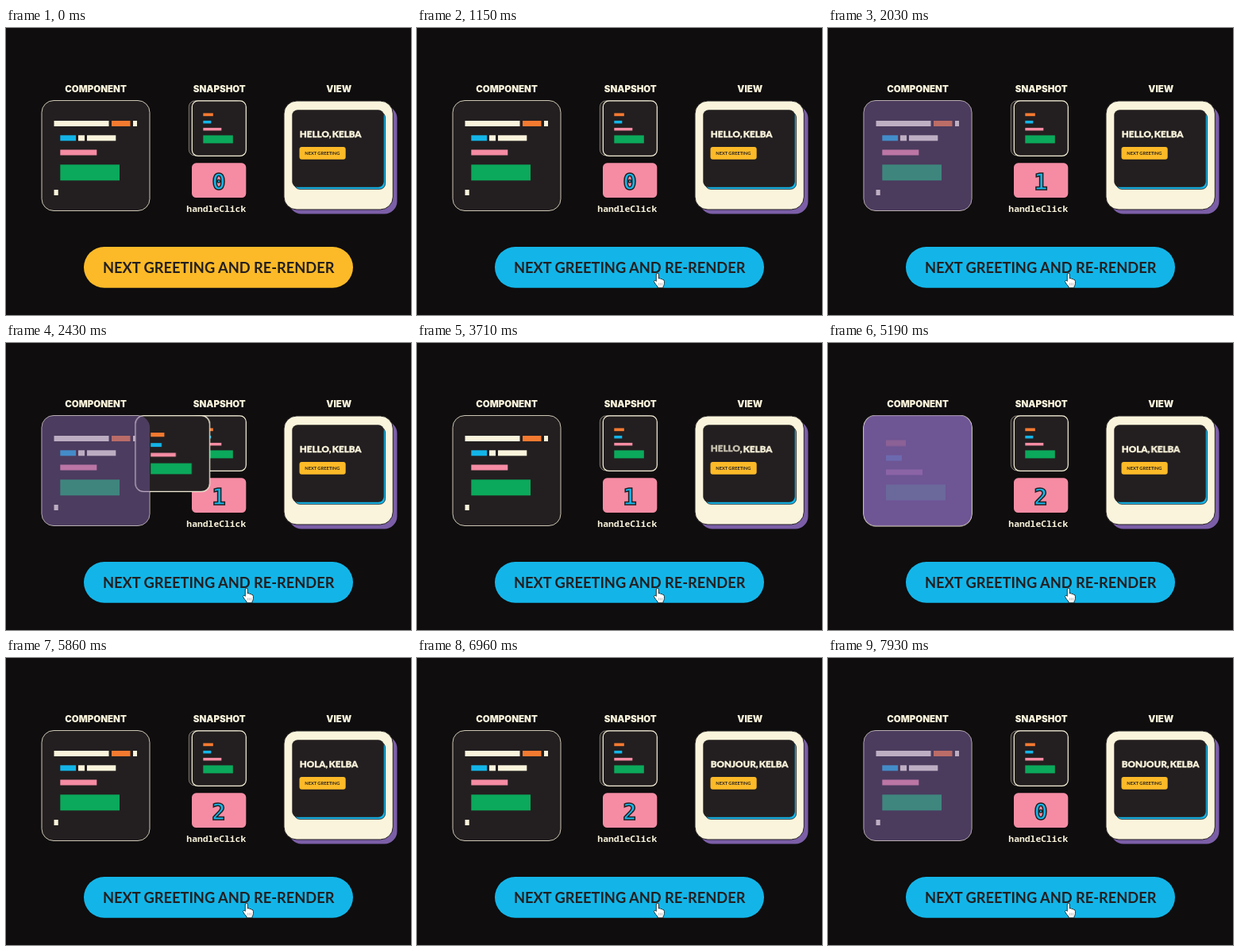
An HTML page for the animation above (8 s loop, 510 px wide and 362 px high).

```html
<!DOCTYPE html>
<html lang="en">
<head>
<meta charset="utf-8">
<title>Component, snapshot, view</title>
<style>
  :root {
    --cream: #faf4dc; --dark: #231f20; --orange: #f47a30; --cyan: #13b5e8;
    --pink: #f58ca4; --green: #0ba95b; --yellow: #fcba28; --purple: #7b5ea7;
    --hello: 36px; --hola: 30px; --bonjour: 56px;
  }
  html, body { margin: 0; width: 100%; height: 100%; overflow: hidden; background: #0f0d0e; }
  svg { display: block; width: 100%; height: 100%; }
  text { font-family: Lato, sans-serif; font-weight: 900; fill: var(--cream); }
  .mid { text-anchor: middle; }
  .title { font-family: Inter, sans-serif; font-size: 11.5px; }
  .greeting { font-size: 11.6px; word-spacing: -1.5px; stroke: var(--cream); stroke-width: .3; }
  .label { font-weight: 700; fill: var(--dark); }
  .mono { font: 600 11.35px "Noto Sans Mono", monospace; }
  .digit {
    font: bold 29px "DejaVu Sans Mono", monospace; fill: var(--cyan);
    stroke: var(--dark); stroke-width: 1.5;
  }
  .panel { fill: var(--dark); stroke: var(--cream); vector-effect: non-scaling-stroke; }
  .cream { fill: var(--cream); } .orange { fill: var(--orange); } .cyan { fill: var(--cyan); }
  .pink { fill: var(--pink); } .green { fill: var(--green); } .yellow { fill: var(--yellow); }
  .purple { fill: var(--purple); } .dark { fill: var(--dark); }

  .anim { animation: 8s linear infinite; }
  #scan { animation-name: scan; }
  #flight { animation-name: appear; }
  #flyer { animation-name: fly; }
  #button { animation-name: hover; }
  #cursor { animation-name: enter; }
  #zero { animation-name: zero; }
  #one { animation-name: one; }
  #two { animation-name: two; }
  #flight, #zero, #one, #two { animation-timing-function: step-end; }
  #hello { animation-name: hello; }
  #hola { animation-name: hola; }
  #bonjour { animation-name: bonjour; }
  #name { animation-name: shift; animation-timing-function: ease-in-out; }

  @keyframes scan {
    0%, 23.94% { opacity: 0; }
    27.1%, 27.2% { opacity: 1; }
    33.25%, 60.81% { opacity: 0; }
    63.97%, 64.07% { opacity: 1; }
    70.12%, 97.69% { opacity: 0; }
    100% { opacity: .74; }
  }
  /* The copy appears while the scan covers the component completely. */
  @keyframes appear {
    0%, 33.4%, 70.3%, 100% { opacity: 0; }
    27.14%, 64.02% { opacity: 1; }
  }
  @keyframes fly {
    0% { transform: translate(45px, 91.5px) scale(1); }
    28.5%, 65.375% {
      transform: translate(45px, 91.5px) scale(1);
      animation-timing-function: cubic-bezier(.5, 1, .89, 1);
    }
    33.375%, 33.41%, 70.25%, 100% { transform: translate(234.3px, 91.9px) scale(.5); }
    33.42% { transform: translate(45px, 91.5px) scale(1); }
  }
  @keyframes hover {
    0%, 11% { fill: var(--yellow); }
    13%, 100% { fill: var(--cyan); }
  }
  @keyframes enter {
    0%, 6.25% { transform: translateY(60px); animation-timing-function: ease-out; }
    14.4%, 100% { transform: none; }
  }
  @keyframes zero { 0% { opacity: 1; } 19.5% { opacity: 0; } 93.25%, 100% { opacity: 1; } }
  @keyframes one { 0% { opacity: 0; } 19.5% { opacity: 1; } 56.4%, 100% { opacity: 0; } }
  @keyframes two { 0% { opacity: 0; } 56.4% { opacity: 1; } 93.25%, 100% { opacity: 0; } }
  @keyframes hello {
    0%, 45.9% { opacity: 1; transform: none; }
    48.1%, 100% { opacity: 0; transform: translateY(-5px); }
  }
  @keyframes hola {
    0%, 46.9% { opacity: 0; transform: translateY(5px); }
    49.4%, 83.4% { opacity: 1; transform: none; }
    85.6%, 100% { opacity: 0; transform: translateY(-5px); }
  }
  @keyframes bonjour {
    0%, 84.4% { opacity: 0; transform: translateY(5px); }
    86.9%, 100% { opacity: 1; transform: none; }
  }
  @keyframes shift {
    0%, 45.9% { transform: translateX(var(--hello)); }
    49.4%, 83.4% { transform: translateX(var(--hola)); }
    86.9%, 100% { transform: translateX(var(--bonjour)); }
  }
</style>
</head>
<body>
<svg viewBox="0 0 510 362">
  <defs>
    <g id="card">
      <rect class="panel" width="136" height="139" rx="15" stroke-width="1.2"/>
      <rect class="orange" x="28" y="31" width="25" height="7.5"/>
      <rect class="cyan" x="28" y="50" width="20" height="7"/>
      <rect class="pink" x="28" y="68" width="46" height="7"/>
      <rect class="green" x="28" y="87" width="75" height="20"/>
    </g>
  </defs>

  <text class="title mid" x="113" y="81.3">COMPONENT</text>
  <text class="title mid" x="268.8" y="81.3">SNAPSHOT</text>
  <text class="title mid" x="419.3" y="81.3">VIEW</text>

  <g id="component">
    <rect class="panel" x="45" y="91.5" width="136" height="139" rx="15" stroke-opacity=".8"/>
    <rect class="cream" x="60.5" y="117" width="69" height="7"/>
    <rect class="orange" x="133" y="117" width="23.5" height="7"/>
    <rect class="cream" x="160" y="117" width="5" height="7"/>
    <rect class="cyan" x="68.3" y="135.3" width="19.7" height="7"/>
    <rect class="cream" x="91" y="135.3" width="8" height="7"/>
    <rect class="cream" x="102" y="135.3" width="36.3" height="7"/>
    <rect class="pink" x="68.3" y="153.5" width="46" height="7"/>
    <rect class="green" x="68.3" y="172.3" width="74.7" height="20"/>
    <rect class="cream" x="60.5" y="204" width="5.2" height="7"/>
  </g>

  <g id="snapshot">
    <rect class="panel" x="230.3" y="91.9" width="68" height="69" rx="7.5" stroke-width=".8" stroke-opacity=".6"/>
    <use href="#card" transform="translate(234.3 91.9) scale(.5)"/>
    <rect class="pink" x="234" y="170.3" width="68.3" height="43.7" rx="5.5"/>
    <text id="zero" class="digit mid anim" x="268" y="203.5">0</text>
    <text id="one" class="digit mid anim" x="268" y="203.5">1</text>
    <text id="two" class="digit mid anim" x="268" y="203.5">2</text>
    <text class="mono mid" x="264.8" y="232">handleClick</text>
  </g>

  <g id="view">
    <rect class="purple" x="356" y="98" width="136.5" height="136.5" rx="16"/>
    <rect class="cream" x="350" y="92" width="137.3" height="137" rx="16" stroke="#231f20"/>
    <rect class="cyan" x="363" y="106" width="114.6" height="97.3" rx="7" stroke="#231f20" stroke-width=".8"/>
    <rect class="dark" x="360.3" y="103.3" width="115.5" height="97.5" rx="7"/>
    <g transform="translate(369.8 138)">
      <text id="hello" class="greeting anim">HELLO</text>
      <text id="hola" class="greeting anim">HOLA</text>
      <text id="bonjour" class="greeting anim">BONJOUR</text>
      <text id="name" class="greeting anim">, KELBA</text>
    </g>
    <rect class="yellow" x="369.5" y="150" width="58.2" height="15.8" rx="3"/>
    <text class="label mid" x="398.3" y="160" font-size="5.7">NEXT GREETING</text>
  </g>

  <g id="flight" class="anim"><g id="flyer" class="anim"><use href="#card"/></g></g>
  <rect id="scan" class="purple anim" x="45" y="91.5" width="136" height="139" rx="15"/>

  <rect id="button" class="anim" x="98" y="276" width="339" height="51.7" rx="25.8"/>
  <text class="label mid" x="267.7" y="308.6" font-size="18.25">NEXT GREETING AND RE-RENDER</text>

  <g id="cursor" class="anim">
    <path d="M301.3 319.5v-8.5q0-1.8 1.5-1.8t1.5 1.8v5q2.2-1 2.7.7q2-.7 2.4.8q2-.2 2 1.8v3q0 2-1.4 3.6v1.8h-7v-1.6q-2.6-2.5-4.2-5.6q-.8-1.5.4-2q1.2-.3 2.1 1z"
      fill="#fff" stroke="#111" stroke-width=".8" stroke-linejoin="round"/>
    <path d="M304.6 321.5v3m2 -3v3m2 -3v3" stroke="#555" stroke-width=".4"/>
  </g>
</svg>
<script>
  // Keep the name right behind whichever greeting is showing.
  for (const id of ["hello", "hola", "bonjour"]) {
    const width = document.getElementById(id).getComputedTextLength();
    document.documentElement.style.setProperty("--" + id, width + "px");
  }
</script>
</body>
</html>
```
